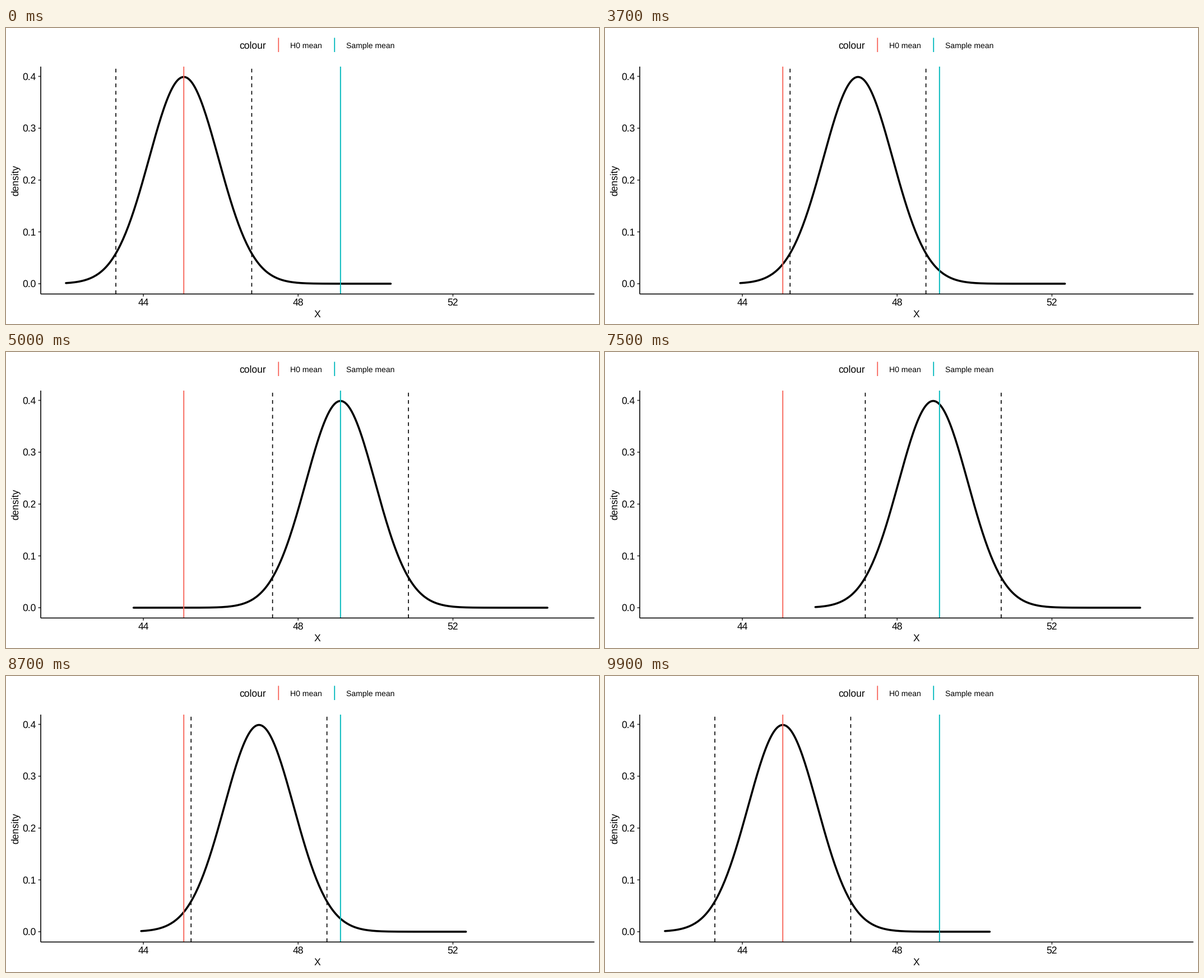
Write a matplotlib script that moves like this. It is 1058 by 529 pixels and loops after 10000 ms.

```python
import numpy as np
import matplotlib.pyplot as plt
from matplotlib.animation import FuncAnimation

plt.rcParams["font.family"] = "Liberation Sans"
plt.rcParams["text.hinting"] = "none"

W, H, DPI = 1058, 529, 64
PT = 72 / DPI  # points per pixel
LEFT, RIGHT, TOP, BOTTOM = 62, 1049.8, 69, 475.4
RED, TEAL = "#F8665C", "#00B8BC"

FRAMES, INTERVAL = 100, 100
STEPS = 25                          # frames in one slide
H0, SAMPLE = 317.2, 596.8           # the two means, in pixels
SIGMA = 61.84
CUT = 1.96 * SIGMA

fig = plt.figure(figsize=(W / DPI, H / DPI), dpi=DPI, facecolor="white")
ax = fig.add_axes([0, 0, 1, 1])
ax.set_xlim(0, W)
ax.set_ylim(H, 0)
ax.axis("off")


def line(x, y, width, color="black", **kw):
    kw.setdefault("solid_capstyle", "butt")
    return ax.plot(x, y, color=color, lw=width * PT, snap=False, **kw)[0]


def label(x, y, text, size=17.5, **kw):
    ax.text(x, y, text, size=size * PT, va="baseline", **kw)


def x_pos(value):
    return 245 + 69.05 * (value - 44)


def y_pos(density):
    return 457 - 926.3 * density


def draw_axes():
    line([LEFT, LEFT], [TOP, BOTTOM], 1.6, zorder=4)
    line([LEFT, RIGHT], [BOTTOM, BOTTOM], 1.6, zorder=4)
    for value in (44, 48, 52):
        x = x_pos(value)
        line([x, x], [BOTTOM, BOTTOM + 4.5], 1.6, "#333333")
        label(x, 496, str(value), ha="center")
    for value in (0, 0.1, 0.2, 0.3, 0.4):
        y = y_pos(value)
        line([LEFT - 4.5, LEFT], [y, y], 1.6, "#333333")
        label(53.5, y + 6.2, f"{value:.1f}", ha="right")
    label(555.7, 517, "X", ha="center")
    ax.text(21.5, 272.3, "density", size=17.5 * PT, rotation=90,
            rotation_mode="anchor", ha="center", va="baseline")


def draw_legend():
    label(416.3, 37, "colour")
    for x, color, name in ((486.2, RED, "H0 mean"), (586.2, TEAL, "Sample mean")):
        line([x, x], [17.5, 43], 1.8, color)
        label(x + 20.6, 36, name, size=14)


draw_axes()
draw_legend()
for mean, color in ((H0, RED), (SAMPLE, TEAL)):
    line([mean, mean], [BOTTOM, TOP], 1.9, color, zorder=3)

curve = line([], [], 3.6, solid_capstyle="round", solid_joinstyle="round", zorder=2)
cuts = [line([], [], 1.65, ls=(0, (4, 4)), dash_capstyle="butt", zorder=2.5)
        for _ in range(2)]


def progress(frame):
    """0 at the H0 mean, 1 at the sample mean; linear slides between rests."""
    if frame < 50:
        return max(0, frame - 25) / STEPS
    return 1 - max(0, frame - 74) / STEPS


def update(frame):
    p = progress(frame)
    mean = H0 + (SAMPLE - H0) * p
    # The left tail is cut short except at rest on the sample mean.
    start = -5.97 if p == 1 else -3.4
    z = np.linspace(start, 5.97, 240)
    curve.set_data(mean + SIGMA * z, y_pos(np.exp(-z * z / 2) / np.sqrt(2 * np.pi)))
    for cut, side in zip(cuts, (-1, 1)):
        x = mean + side * CUT
        cut.set_data([x, x], [BOTTOM, TOP])
    return [curve, *cuts]


def init():
    return update(0)


anim = FuncAnimation(fig, update, frames=FRAMES, init_func=init,
                     interval=INTERVAL, repeat=True, repeat_delay=0, blit=False)
plt.show()
```
